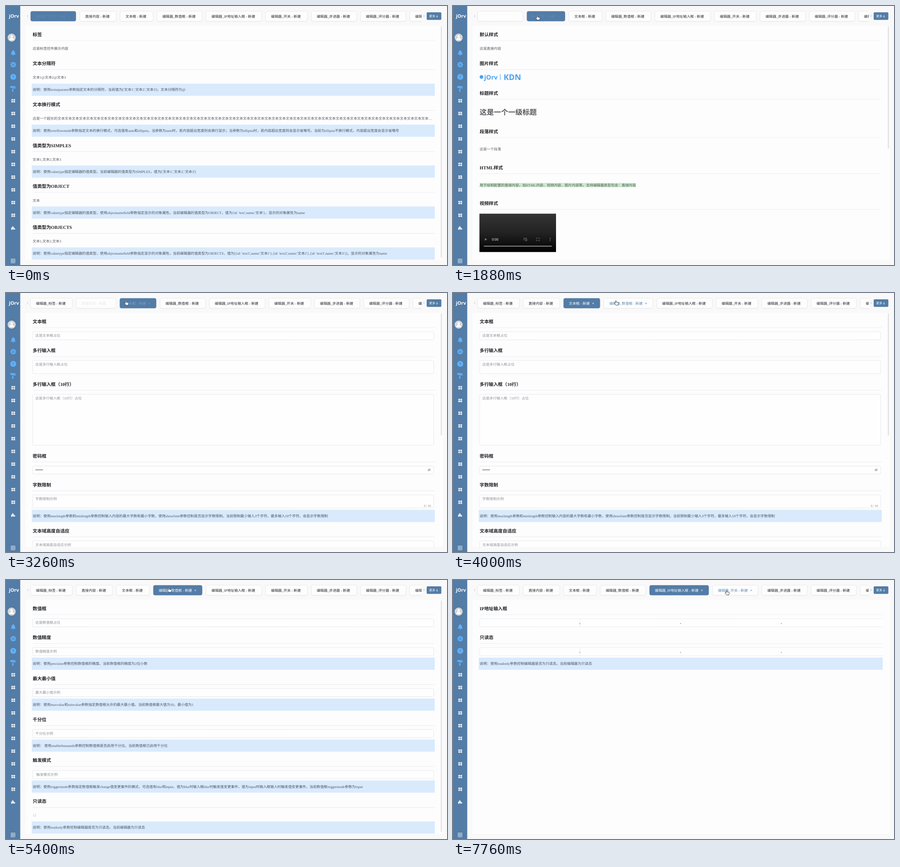
Recreate the animation shown at these times as an HTML page with a canvas. Size 976 by 574 pixels, loop 8000 ms.

```html
<!DOCTYPE html>
<html>
<head>
<meta charset="utf-8">
<style>
html, body { margin: 0; width: 976px; height: 574px; overflow: hidden; background: #f9f9fa; }
canvas { display: block; }
</style>
</head>
<body>
<canvas id="stage" width="976" height="574"></canvas>
<script>
const ctx = document.getElementById('stage').getContext('2d');
const LOOP = 8000, BODY = 7.9, BLUE = '#537ca6';
const SERIF = '"Liberation Serif", "Noto Sans CJK SC", serif';
const SANS = '"Noto Sans", "Noto Sans CJK SC", sans-serif';
const DARK_RGB = [40, 41, 44], HOVER_RGB = [92, 137, 186], WHITE_RGB = [255, 255, 255];

// label, hover start, hover end, selected, left
const NEVER = Infinity;
const tabs = [
  ['编辑器_标签', -2, -1, 0, 1880],
  ['直接内容', 900, 1170, 1880, 3180],
  ['文本框', 2180, 2400, 3180, 4920],
  ['编辑器_数值框', 3650, 3950, 4920, 6400],
  ['编辑器_IP地址输入框', 5720, 6010, 6400, NEVER],
  ['编辑器_开关', 7220, 7420, NEVER, NEVER],
  ['编辑器_步进器'], ['编辑器_评分器'], ['编辑器_滑块']
].map(([name, enter = NEVER, hovered = NEVER, select = NEVER, leave = NEVER]) =>
  ({ label: name + ' - 新建', enter, hovered, select, leave }));

// time, x, y
const cursorPath = [
  [800, 194, 30], [1000, 188, 26], [1950, 188, 26], [2280, 267, 22], [3400, 267, 22],
  [3900, 362, 22], [5660, 362, 22], [6010, 494, 24], [7110, 494, 24], [7420, 607, 28]
];

function ramp(t, from, to) {
  if (t <= from) return 0;
  if (t >= to) return 1;
  const p = (t - from) / (to - from);
  return p * p * (3 - 2 * p);
}
const mix = (a, b, p) => `rgb(${a.map((v, i) => Math.round(v + (b[i] - v) * p))})`;

function setFont(size, weight = 400, family = SERIF) {
  ctx.font = `${weight} ${size}px ${family}`;
  ctx.textRendering = 'geometricPrecision';
}
function text(s, x, middle, color = '#58595c', size = BODY, weight, family) {
  setFont(size, weight, family);
  ctx.fillStyle = color;
  ctx.fillText(s, x, middle + size * 0.38);
}
function box(x, y, w, h, r, fill, stroke) {
  ctx.beginPath();
  ctx.roundRect(x, y, w, h, r);
  if (fill) { ctx.fillStyle = fill; ctx.fill(); }
  if (stroke) { ctx.strokeStyle = stroke; ctx.lineWidth = 0.8; ctx.stroke(); }
}
function disc(x, y, r, fill) {
  ctx.beginPath();
  ctx.arc(x, y, r, 0, 7);
  ctx.fillStyle = fill;
  ctx.fill();
}
function shape(d, x, y, fill, stroke, width = 1) {
  ctx.save();
  ctx.translate(x, y);
  const path = new Path2D(d);
  if (fill) { ctx.fillStyle = fill; ctx.fill(path); }
  if (stroke) { ctx.strokeStyle = stroke; ctx.lineWidth = width; ctx.stroke(path); }
  ctx.restore();
}

// Section contents; y is the heading's middle line.
const plain = s => y => text(s, 59, y + 31);
const input = (hint, extra = 0, x = 65) => y => {
  box(59, y + 22.5, 887.5, 18 + extra, 2, '#fefefe', '#e3e4e7');
  text(hint, x, y + 31, '#8f9195');
};
function password(y) {
  input('')(y);
  for (let i = 0; i < 6; i++) disc(66.5 + i * 2.8, y + 31, 1, '#444');
  shape('M-3.5 0Q0-4 3.5 0Q0 4-3.5 0M-2.5 3L2.5-3M1 0A1 1 0 1 1-1 0A1 1 0 1 1 1 0', 936.5, y + 31, null, '#888', 0.7);
}
function limited(y) {
  input('字数限制示例', 11)(y);
  text('0 / 10', 925, y + 47, '#77797d', 6.8);
}
function address(y) {
  shape('M892 0H2Q0 0 0 2V16Q0 18 2 18H892M222 0V18', 59, y + 22.5, '#fefefe', '#e6e7ea', 0.8);
  for (let i = 1; i < 4; i++) disc(57.6 + i * 223, y + 33.3, 0.8, '#444');
}
function brand(y) {
  disc(63, y + 30, 4, '#4aa3ee');
  text('jOrv', 69, y + 30, '#4aa3ee', 14, 700, SANS);
  box(104, y + 24, 1, 13, 0, '#4aa3ee');
  text('KDN', 112, y + 30, '#4aa3ee', 17.5, 600, SANS);
}
function highlighted(y) {
  const s = '用于绘制配置的直接内容，如HTML内容、视频内容、图片内容等。支持编辑器类型包含：直接内容';
  setFont(BODY);
  box(59, y + 34.3, ctx.measureText(s).width, 9.5, 0, '#c9eccb');
  text(s, 59, y + 39);
}
function video(y) {
  const shade = ctx.createLinearGradient(0, y + 23, 0, y + 108);
  shade.addColorStop(0, '#343434');
  shade.addColorStop(0.5, '#222');
  shade.addColorStop(1, '#020202');
  box(58.5, y + 23, 169.5, 85, 0, shade);
  const row = y + 80;
  shape('M-2-3L3 0L-2 3Z', 72.5, row, '#777');
  text('0:00', 86, row, '#eee', 7.5, 400, 'Roboto, sans-serif');
  shape('M-4-1.5H-2L1-4V4L-2 1.5H-4ZM-4-4L4 4M2.5-2.5Q4.5 0 2.5 2.5', 160.5, row, null, '#777', 0.8);
  shape('M-3-1V-3H-1M1-3H3V-1M3 1V3H1M-1 3H-3V1', 188, row, null, '#777');
  for (let i = -1; i < 2; i++) disc(215, row + i * 2.8, 0.8, '#aaa');
  box(68, y + 94, 151, 2, 1, '#8c8c8c');
}

const READONLY = '使用readonly参数控制编辑器是否为只读态。当前编辑器为只读态';
const TYPE = '使用valuetype指定编辑器的值类型';
const FIELD = TYPE + '，使用objectnamefield参数指定显示的对象属性。当前编辑器的值类型为';

// Sections: heading, content, note, extra height
const pages = [
  { right: 949, bar: 513, sections: [
    ['标签', plain('这是标签控件展示内容')],
    ['文本分隔符', plain('文本1@文本2@文本3'), "使用textseparator参数指定文本的分隔符，当前值为['文本1','文本2','文本3']，文本分隔符为@"],
    ['文本换行模式', plain('这是一个超长的' + '文本'.repeat(52) + '…'), '使用overflowmode参数指定文本的换行模式，可选值有auto和ellipsis。当参数为auto时，若内容超出宽度则会换行显示；当参数为ellipsis时，若内容超出宽度则会显示省略号。当前为ellipsis不换行模式，内容超出宽度会显示省略号'],
    ['值类型为SIMPLES', plain('文本1,文本2,文本3'), TYPE + "。当前编辑器的值类型为SIMPLES，值为['文本1','文本2','文本3']"],
    ['值类型为OBJECT', plain('文本'), FIELD + "OBJECT，值为{id: 'text',name:'文本'}，显示的对象属性为name"],
    ['值类型为OBJECTS', plain('文本1,文本2,文本3'), FIELD + "OBJECTS，值为[{id: 'text1',name:'文本1'},{id: 'text2',name:'文本2'},{id: 'text3',name:'文本3'}]，显示的对象属性为name"]
  ] },
  { right: 947, bar: 271, sections: [
    ['默认样式', plain('这是直接内容')],
    ['图片样式', brand, '', 2.2],
    ['标题样式', y => text('这是一个一级标题', 59, y + 41.5, '#58595c', 15.8, 700), '', 21],
    ['段落样式', y => text('这是一个段落', 59, y + 39), '', 15.6],
    ['HTML样式', highlighted, '', 15.6],
    ['视频样式', video]
  ] },
  { right: 949, bar: 271, sections: [
    ['文本框', input('这是文本框占位')],
    ['多行输入框', input('这是多行输入框占位', 11), '', 11],
    ['多行输入框（10行）', input('这是多行输入框（10行）占位', 95), '', 95],
    ['密码框', password],
    ['字数限制', limited, '使用maxlength参数和minlength参数控制输入内容的最大字数和最小字数，使用showlimit参数控制是否显示字数限制。当前限制最少输入3个字符，最多输入10个字符，会显示字数限制', 11],
    ['文本域高度自适应', input('文本域高度自适应示例', 11)]
  ] },
  { right: 949, bar: 513, sections: [
    ['数值框', input('这是数值框占位')],
    ['数值精度', input('数值精度示例'), '使用precision参数控制数值框的精度。当前数值框的精度为2位小数'],
    ['最大最小值', input('最大最小值示例'), '使用maxvalue和minvalue参数指定数值框允许的最大最小值。当前数值框最大值为10，最小值为1'],
    ['千分位', input('千分位示例'), ' 使用enablethousands参数控制数值框是否启用千分位。当前数值框已启用千分位'],
    ['触发模式', input('触发模式示例', 0, 67), '使用triggermode参数指定数值框触发change值变更事件的模式，可选值有blur和input，值为blur时输入框blur时触发值变更事件，值为input时输入框输入时触发值变更事件。当前数值框triggermode参数为input'],
    ['只读态', y => text('12', 59, y + 31, '#b4b6ba'), READONLY]
  ] },
  { right: 951, bar: 0, sections: [
    ['IP地址输入框', address],
    ['只读态', address, READONLY]
  ] }
];

function drawPage({ right, bar, sections }) {
  ctx.save();
  box(43, 44, 924, 519, 3, '#fdfdfe');
  ctx.clip();
  let y = 63.3;
  for (const [title, content, note, extra = 0] of sections) {
    text(title, 59, y, '#1f2023', 10.16, 700);
    box(59, y + 13.2, right - 59, 0.8, 0, '#e6e7e9');
    content(y);
    if (note) {
      box(57, y + 44.7 + extra, right - 57, 27, 0, '#d9eafd');
      text('说明：' + note, 59, y + 58 + extra, '#4c5460');
    }
    y += 63.9 + extra + (note ? 26.9 : 0);
  }
  if (bar) box(962.3, 45, 2.6, bar, 1.3, '#e1e2e6');
  ctx.restore();
}

function drawTabs(t) {
  ctx.save();
  ctx.beginPath();
  ctx.rect(53, 8, 867, 30);
  ctx.clip();
  let x = 54.3;
  tabs.forEach((tab, i) => {
    const { label, enter, hovered, select, leave } = tab;
    const hover = ramp(t, enter, hovered), fade = ramp(t, leave, leave + 400);
    const active = t >= select && t < leave;
    // The second tab opens only half-way until it is clicked.
    const settle = i === 1 ? 0.5 + 0.5 * ramp(t, select, select + 250) : 1;
    const open = hover * settle * (1 - fade);
    setFont(BODY, 500);
    const labelWidth = ctx.measureText(label).width;
    const width = labelWidth + 26.8 + 8 * open;
    ctx.shadowColor = 'rgba(0,0,0,.10)';
    ctx.shadowBlur = 2;
    ctx.shadowOffsetY = 0.5;
    box(x, 11.5, width, 22.3, 4, active ? BLUE : '#fdfdfd');
    ctx.shadowColor = 'transparent';
    if (!active) box(x, 11.5, width, 22.3, 4, null, '#e9eaec');
    const color = t >= leave ? mix(WHITE_RGB, DARK_RGB, fade)
      : active ? mix(HOVER_RGB, WHITE_RGB, ramp(t, select, select + 300))
      : mix(DARK_RGB, HOVER_RGB, hover);
    const start = x + 12 - 8 * (1 - settle) * hover;
    text(label, start, 22.7, color, BODY, 500);
    if (hover && t < leave) {
      ctx.globalAlpha = hover;
      shape('M-1.6-1.6L1.6 1.6M1.6-1.6L-1.6 1.6', start + labelWidth + 7.5, 23, null, color, 0.8);
      ctx.globalAlpha = 1;
    }
    x += width + 8.5;
  });
  ctx.restore();
  shape('M1-2.3L-1 0L1 2.3', 48, 22.3, null, '#b5b7bb', 0.8);
  shape('M-1-2.3L1 0L-1 2.3', 925, 22, null, '#a0a2a6', 0.8);
  box(931, 14, 32.5, 16.7, 2, BLUE);
  text('更多', 936.5, 22.3, '#fff', 6.8, 500);
  shape('M0-2.5V2.5M-1.8.8L0 2.6L1.8.8', 954, 22.5, null, '#fff', 0.8);
}

function drawSidebar() {
  const sky = '#60b0f8', pale = '#e8eff6';
  box(0, 0, 31.5, 574, 0, BLUE);
  text('jOrv', 6.5, 22.5, '#fff', 10.5, 700, SANS);
  disc(12.5, 70, 9, '#d3d5d8');
  disc(12.5, 67.3, 2.7, '#fff');
  shape('M-5 5Q-5 0 0 0Q5 0 5 5Z', 12.5, 70.5, '#fff');
  shape('M-5.5 4Q-3.8 2-3.8-1Q-3.5-4.5-.7-5V-6.2H.7V-5Q3.5-4.5 3.8-1Q3.8 2 5.5 4ZM-1.5 5H1.5L0 6.5Z', 16, 104, sky);
  disc(16, 130, 5, sky);
  for (let i = 0; i < 8; i++) disc(16 + 5 * Math.cos(i * Math.PI / 4), 130 + 5 * Math.sin(i * Math.PI / 4), 1.5, sky);
  disc(16, 130, 2.6, BLUE);
  disc(16, 130, 1.4, sky);
  disc(16, 157, 6.6, sky);
  text('?', 14, 156.7, BLUE, 8, 700, SANS);
  shape('M-6-6H4V-2H-6ZM4-5H6V-.5H0V1H1V6.5H-2V1H-1V-1.5H5V-4H4Z', 15.5, 183.5, sky);
  for (let i = 0; i < 10; i++) {
    const y = 210 + i * 28.2;
    for (const dx of [-4.2, 0.4]) for (const dy of [-3.7, 0.4]) box(16 + dx, y + dy, 3.8, 3.3, 0.7, pale);
  }
  shape('M-4-1H-2V-3Q-.5-5 1-3V-1H3V1H5V3H3V4H.8V2H-.8V4H-4Z', 15.5, 492, pale);
  shape('M-5-4H5M-5-1.3H2M-5 1.3H2M-5 4H5M5-1.8L3 0L5 1.8', 15.5, 565, null, '#fff', 1.1);
}

function drawCursor(t) {
  if (t < cursorPath[0][0]) return;
  let [, x, y] = cursorPath[0];
  for (let i = 1; i < cursorPath.length; i++) {
    const [t0, x0, y0] = cursorPath[i - 1], [t1, x1, y1] = cursorPath[i];
    if (t < t0) break;
    const p = ramp(t, t0, t1);
    x = x0 + (x1 - x0) * p;
    y = y0 + (y1 - y0) * p;
  }
  shape('M-2.6-4.2Q-1.6-5.8-.6-4.2V-1.5L3.2-.8Q4.8-.3 4.4 1.6L3.4 5H-1.6L-4.8.9Q-4.8-.8-3.4-.2L-2.6.5Z', x, y, '#fff', '#33363b', 0.9);
}

function frame(now) {
  const t = now % LOOP;
  ctx.fillStyle = '#f9f9fa';
  ctx.fillRect(0, 0, 976, 574);
  drawPage(pages[tabs.findIndex(tab => t >= tab.select && t < tab.leave)]);
  drawTabs(t);
  drawSidebar();
  drawCursor(t);
  requestAnimationFrame(frame);
}
requestAnimationFrame(frame);
</script>
</body>
</html>
```
